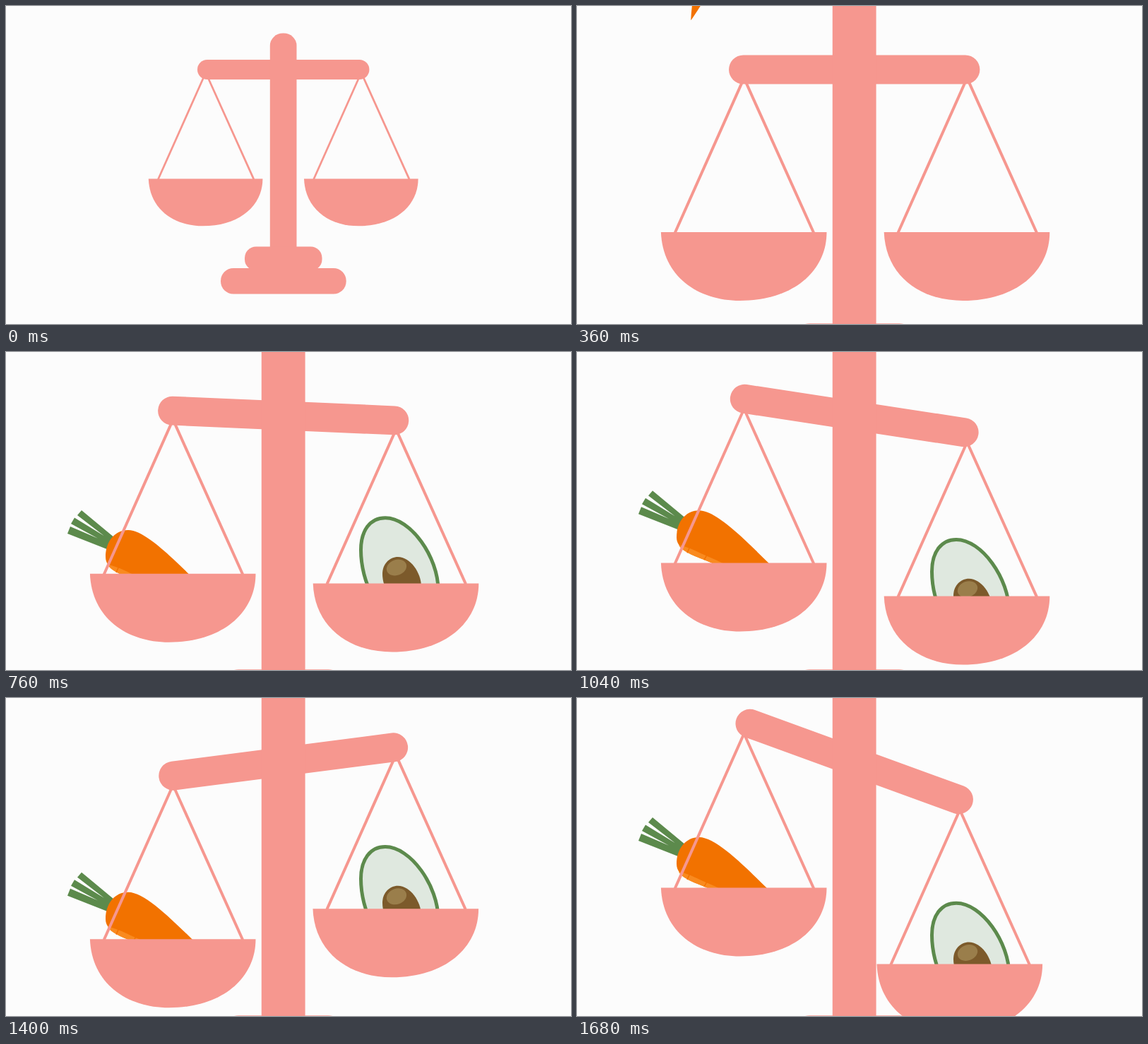
An HTML page for the animation above (2 s loop, 800 by 450 pixels).

```html
<!DOCTYPE html>
<html lang="en">
<head>
<meta charset="utf-8">
<title>Scales</title>
<style>
  html, body { margin: 0; width: 100%; height: 100%; overflow: hidden; background: #fcfcfc; }
  svg { display: block; width: 100vw; height: 100vh; }
  .pink { fill: #f6978f; }
  .rope { fill: none; stroke: #f6978f; stroke-width: 4; }
  .green { fill: #5c8a4c; }
</style>
</head>
<body>
<svg viewBox="0 0 800 450">
  <defs>
    <g id="pan">
      <path class="rope" d="M-97.5 1 L0.3 -218 L99 1"/>
      <path class="pink" d="M-117.3 0 H117.3 C117.3 55 70 97 -5.5 97 C-66 97 -115 62 -117.3 0Z"/>
    </g>
  </defs>

  <g id="carrot">
    <path class="green" d="M107 224 L154 263 149 268 101 231Z M97 234.500 L150 267 147 273 92 243Z M91 247 L147 271 143 279 87 257Z"/>
    <path fill="#f27200" d="M141 290 C141 268 154 252 173 252 C198 252 240 296 272 327 C296 347 318 364 326 372 C270 362 225 340 178 321 C160 314 141 306 141 290Z"/>
    <path fill="#f98a1f" d="M144 301 C152 302 164 307 176 313 C192 320 212 328 232 341 C212 334 195 328 178 321 C162 315 148 309 144 301Z"/>
    <path stroke="#f27200" stroke-width="1.500" d="M160 303 L156 312 M184 315 L180 322"/>
  </g>

  <g id="avocado">
    <path fill="#dfe8df" stroke="#5c8a4c" stroke-width="5" d="M502.500 280 C502.500 252 516 234.700 537 234.700 C573 234.700 612 290 612 337 C612 364 590 378 565 378 C527 378 502.500 325 502.500 280Z"/>
    <path fill="#7c5a2b" d="M533 314 C533 300 543 290 555 290 C572 290 588 312 588 332 C588 348 578 356 566 356 C548 356 533 336 533 314Z"/>
    <ellipse cx="553" cy="305" rx="14.500" ry="11" fill="#9a7e4b" transform="rotate(-20 553 305)"/>
  </g>

  <use id="left" href="#pan"/>
  <use id="right" href="#pan"/>
  <rect id="beam" class="pink" x="-177.700" y="-20.500" width="355.400" height="41" rx="20.500"/>
  <g id="post" class="pink">
    <rect x="373.800" y="38.500" width="37.700" height="330" rx="18.500" ry="17.500"/>
    <rect x="338" y="340.500" width="109.500" height="34" rx="16"/>
    <rect x="304" y="371" width="177.700" height="36.500" rx="18"/>
  </g>
</svg>
<script>
  const LOOP = 2000, STEP = 40, ZOOM_END = 360, LAND = 760;

  // [time, value] keys, eased in and out between neighbours
  const swing = (peak, dip, end) => [[655, 0], [970, peak], [1370, dip], [1680, end]];
  const ride = (peak, dip, end) => [[LAND, 0], [1005, peak], [1370, dip], [1680, end]];
  const tracks = {
    zoom: [[0, 0], [ZOOM_END, 1]],
    tilt: swing(10, -8, 20),
    leftY: swing(-25, 23, -51.5),
    rightY: swing(29.5, -23.5, 56.5),
    rightX: [[1370, 0], [1680, -10.2]],
    carrotY: ride(-29, 24.5, -55),
    avocadoY: ride(32, -26, 55.5)
  };

  const mix = (a, b, u) => a + (b - a) * u;
  const ease = u => (1 - Math.cos(Math.PI * u)) / 2;

  function at(name, t) {
    const keys = tracks[name];
    if (t <= keys[0][0]) return keys[0][1];
    for (let i = 1; i < keys.length; i++) {
      const [t0, a] = keys[i - 1], [t1, b] = keys[i];
      if (t < t1) return mix(a, b, ease((t - t0) / (t1 - t0)));
    }
    return keys[keys.length - 1][1];
  }

  const set = (id, value) => document.getElementById(id).setAttribute('transform', value);

  function placePan(id, zoom, x0, x1, dx, dy) {
    const x = mix(x0, x1, zoom) + dx, y = mix(244.5, 320, zoom) + dy;
    set(id, `translate(${x} ${y}) scale(${mix(0.689, 1, zoom)})`);
  }

  function placeFood(id, fall, y, height, spin, pivot) {
    set(id, `translate(0 ${y - height * fall}) rotate(${spin * fall} ${pivot})`);
  }

  function draw(t) {
    const zoom = at('zoom', t);
    const fall = Math.pow(Math.max(0, LAND - t) / 400, 1.43);
    const s = mix(1, 1.64, zoom);

    set('post', `translate(392.6 170.6) scale(${s}) translate(-392.6 -170.6)`);
    set('beam', `translate(392.7 90) rotate(${at('tilt', t)}) scale(${mix(0.685, 1, zoom)})`);
    placePan('left', zoom, 282.6, 236.2, 0, at('leftY', t));
    placePan('right', zoom, 502.8, 552, at('rightX', t), at('rightY', t));
    placeFood('carrot', fall, at('carrotY', t), 404, 83, '214 305');
    placeFood('avocado', fall, at('avocadoY', t), 430, -45, '556 306');
  }

  const start = performance.now();
  function tick() {
    const t = (performance.now() - start) % LOOP;
    draw(Math.floor(t / STEP) * STEP);
    requestAnimationFrame(tick);
  }
  tick();
</script>
</body>
</html>
```
